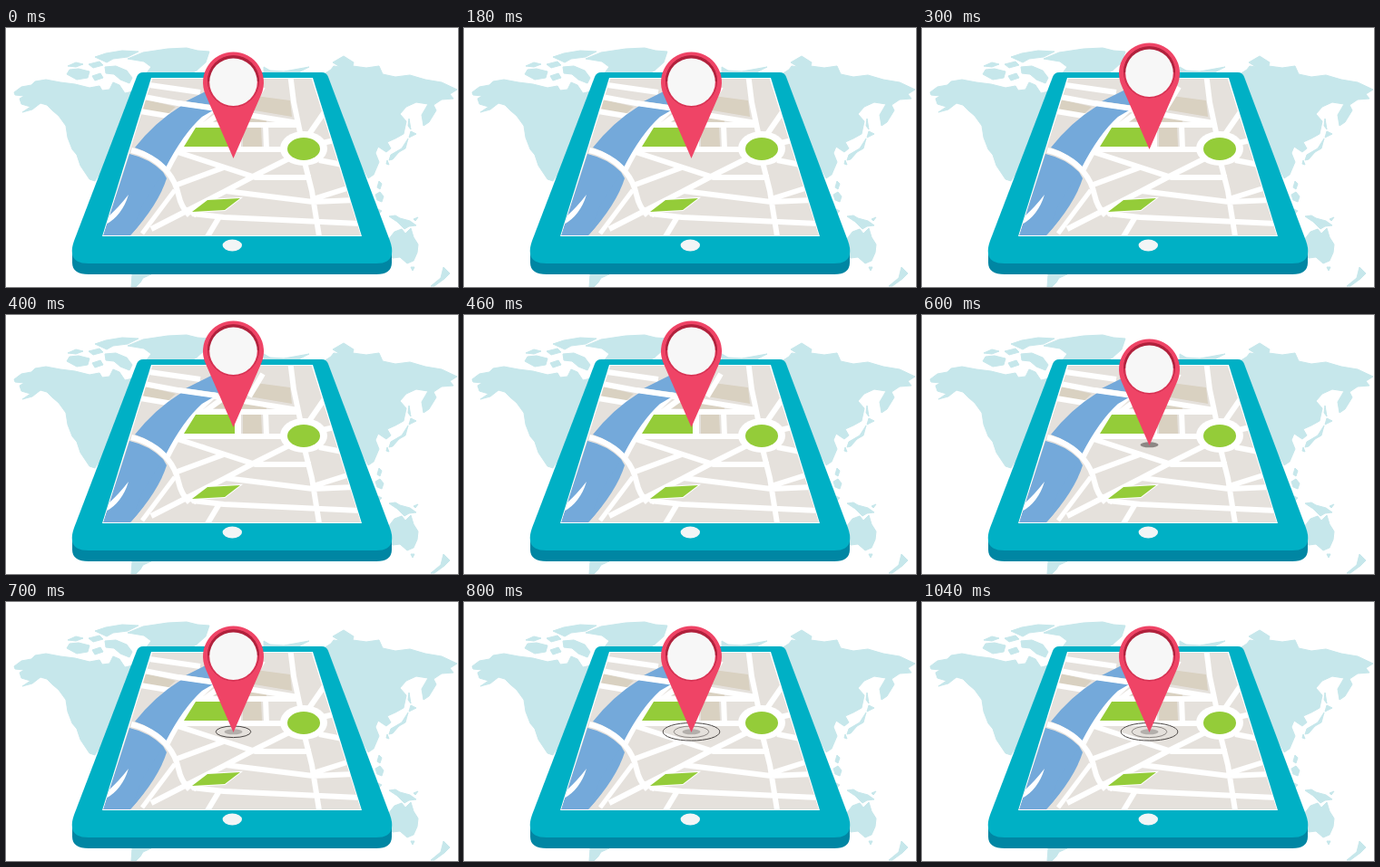
Animation of 498 by 286 pixels, one loop 1.2 s. Source, as an HTML page:

```html
<!DOCTYPE html>
<html lang="en">
<head>
<meta charset="utf-8">
<title>Map pin</title>
<style>
  html, body { margin: 0; width: 100%; height: 100%; overflow: hidden; background: #fff; }
  svg { display: block; width: 498px; height: 286px; }
  .land { fill: #c6e7eb; stroke: #c6e7eb; stroke-linejoin: round; }
  .roads { fill: none; stroke: #fff; stroke-width: 6; }
  .tan { fill: #d9d1c1; }
  .river { fill: #74a9da; }
  .park { fill: #94cc39; }
  .ring { fill: none; stroke-width: 1; }
</style>
</head>
<body>
<svg viewBox="0 0 498 286">
  <defs>
    <clipPath id="screen"><path d="M161 56H337L391 229H107Z"/></clipPath>
    <clipPath id="patch"><path d="M216 6H287V134H216Z"/></clipPath>
  </defs>

  <g id="scene">
    <g class="land">
      <!-- Americas -->
      <path d="M9 71L17 65L28 63L32 59L44 57L60 60L76 62L92 66L103 64L106 69L114 68L118 60L125 63L131 72L140 70L130 100L110 150L98 169L92 167L82 152L78 140L73 134L68 121L66 108L58 97L51 91L45 85L38 83L29 90L18 93L27 87L17 84L15 78L20 75L10 74Z"/>
      <path d="M67 51L70 46L80 45L92 48L90 55L78 57Z M68 42L77 38L85 40L77 43Z M91 40L103 37L107 41L96 44Z M95 53L104 50L107 55L98 58Z M98 32L110 28L128 25L146 26L134 32L118 34L111 38Z M109 43L121 42L133 47L139 55L136 61L126 57L119 51L110 50Z"/>
      <path d="M134 34L151 27L178 23L199 22L211 25L224 26L220 38L210 47L200 52H153L160 43L152 37Z"/>
      <path d="M139 272H160L151 276L148 281L143 286H138Z"/>
      <!-- Eurasia -->
      <path d="M284 43L291 47L306 48L334 43L326 47L318 52H284Z"/>
      <path d="M354 60L350 51L358 46L361 42L368 43L360 38L372 31L383 38L382 42L397 44L411 42L415 51L429 54L445 52L462 57L480 60L497 68L489 73L493 78L480 79L471 85L474 91L466 104L460 108L458 96L465 84L452 82L441 87L434 95L441 103L438 117L429 122L420 126L424 133L419 137L410 131L407 138L411 148L405 162L399 166L380 130Z"/>
      <path d="M444 100L446 112L443 108Z M446 114L452 117L444 121Z M443 122L440 133L433 137L426 145L422 146L424 140L436 133Z M420 146L422 151L419 150Z"/>
      <!-- Oceania -->
      <path d="M411 169L414 172L412 178L409 176Z M412 181L416 186L414 192L409 190L407 184Z M410 200L414 202L411 205Z M422 208L429 207L434 210L445 213L452 218L444 219L439 222L431 214Z M449 211L454 209L451 213Z"/>
      <path d="M421 234L428 225L436 222L440 227L446 221L449 231L454 239L453 248L449 257L442 260L434 253L426 254L420 250Z M446 264L450 264L448 268Z M482 264L489 271L483 277L472 285L468 285L479 276Z"/>
    </g>

    <!-- Tablet -->
    <path fill="#0086a3" d="M73 245V259Q73 272 91 272H408Q425 272 425 259V245Z"/>
    <path fill="#00b0c5" d="M151 49H348Q353 49 355 54L423 235Q426 243 425 250Q423 260 408 260H91Q75 260 73 250Q72 243 75 235L144 54Q146 49 151 49Z"/>
    <ellipse cx="249.300" cy="240" rx="10.700" ry="6.500" fill="#f2f5f6"/>
    <path fill="#fff" d="M160 55H338L392 230H106Z"/>

    <g clip-path="url(#screen)">
      <path fill="#e5e1dc" d="M161 56H337L391 229H107Z"/>
      <path class="tan" d="M154 79L187 87L178 95L151 90Z M275 75L313 80L315 98L268 90Z M222 103L237 92L287 101V104Z M261 110H281L282 131H261Z"/>

      <g class="roads">
        <path d="M158 63L214 71M152 76L205 86L322 105M148 92L184 98M205 107H324M190 134H308"/>
        <path d="M283 65L268 90M256 107V134M286 107L287 134M242 90L217 108"/>
        <path d="M313 50L317 82L325 120M352 91L332 120M340 129L366 123M345 146L371 151"/>
        <path d="M186 136L275 165H336M312 144L276 162L240 181L160 222M240 154L186 174"/>
        <path d="M329 148L337 180L345 230M338 189L376 177M242 180L338 192L384 190M205 205L240 209L390 216M236 207L221 232"/>
        <path d="M186 179L150 227M198 200L210 207" stroke-width="5"/>
      </g>

      <!-- River and its banks -->
      <path d="M232 86L216 101Q195 121 178 156" class="roads" stroke-width="7"/>
      <path class="river" d="M212 74L226 67H262L234 86L198 81Z M193 86L228 91L216 98Q195 117 176 154Q161 138 142 132Q164 104 193 86Z M136 139Q158 144 173 159Q168 195 137 229H107L114 207Z"/>
      <path class="roads" d="M138 135Q163 141 178 159Q187 170 190 184T202 207" stroke-width="8"/>
      <path class="roads" d="M190 83L232 89"/>
      <path class="river" d="M173 159L177 166Q168 195 137 229L150 195Z"/>
      <path fill="#fff" d="M135 184Q124 198 114 207L110 217Q128 207 135 184Z"/>

      <path class="park" stroke="#fff" stroke-width="2" paint-order="stroke" d="M209 110H252V131H196Z M205 203L222 190L258 188L241 201Z"/>
      <ellipse cx="328" cy="133" rx="26" ry="19" fill="#fff"/>
      <ellipse cx="328" cy="133.500" rx="18" ry="12.500" class="park"/>
    </g>
  </g>

  <ellipse id="shadow" cx="250.500" cy="143.300" rx="10" ry="3"/>
  <ellipse id="innerRing" class="ring" cx="250.500" cy="143.300" rx="19.300" ry="6.300"/>
  <ellipse id="outerRing" class="ring" cx="250.500" cy="143.300" rx="31.300" ry="9.800" stroke="#4b4745"/>

  <g id="pin">
    <path fill="#ef4466" d="M250.500 144L219.800 73.400A33.500 33.500 0 1 1 281.200 73.400Z"/>
    <circle cx="250.500" cy="58.700" r="28.500" fill="#b0213c"/>
    <circle cx="250.500" cy="59.700" r="27.800" fill="#d93455"/>
    <path fill="#b0213c" d="M222 59A28.500 28.500 0 0 1 279 59Z"/>
    <circle cx="250.500" cy="59.700" r="26.300" fill="#f7f7f7"/>
  </g>
</svg>
<script>
  const [scene, shadow, innerRing, outerRing, pin] =
    ["scene", "shadow", "innerRing", "outerRing", "pin"].map(id => document.getElementById(id));
  const LOOP = 1200, HOLD = 300, STEP = 100;
  const show = (node, visible) => node.setAttribute("visibility", visible ? "visible" : "hidden");

  function draw(now) {
    const time = now % LOOP;
    // Pose 0 rests, 1-3 hop, 4-6 spread the ripples; the last pose holds.
    const pose = time < HOLD ? 0 : Math.min(6, 1 + Math.floor((time - HOLD) / STEP));
    const lift = 10 * Math.max(0, 2 - Math.abs(pose - 2));
    pin.setAttribute("transform", `translate(0 ${-lift})`);

    // The scene blinks away around the pin as it falls.
    if (pose === 3) scene.setAttribute("clip-path", "url(#patch)");
    else scene.removeAttribute("clip-path");

    show(shadow, pose >= 4);
    show(innerRing, pose >= 5);
    show(outerRing, pose >= 6);
    shadow.setAttribute("fill", pose === 4 ? "#8c8784" : "#b3afab");
    innerRing.setAttribute("stroke", pose === 5 ? "#4b4745" : "#8c8784");
    requestAnimationFrame(draw);
  }
  draw(performance.now());
</script>
</body>
</html>
```
